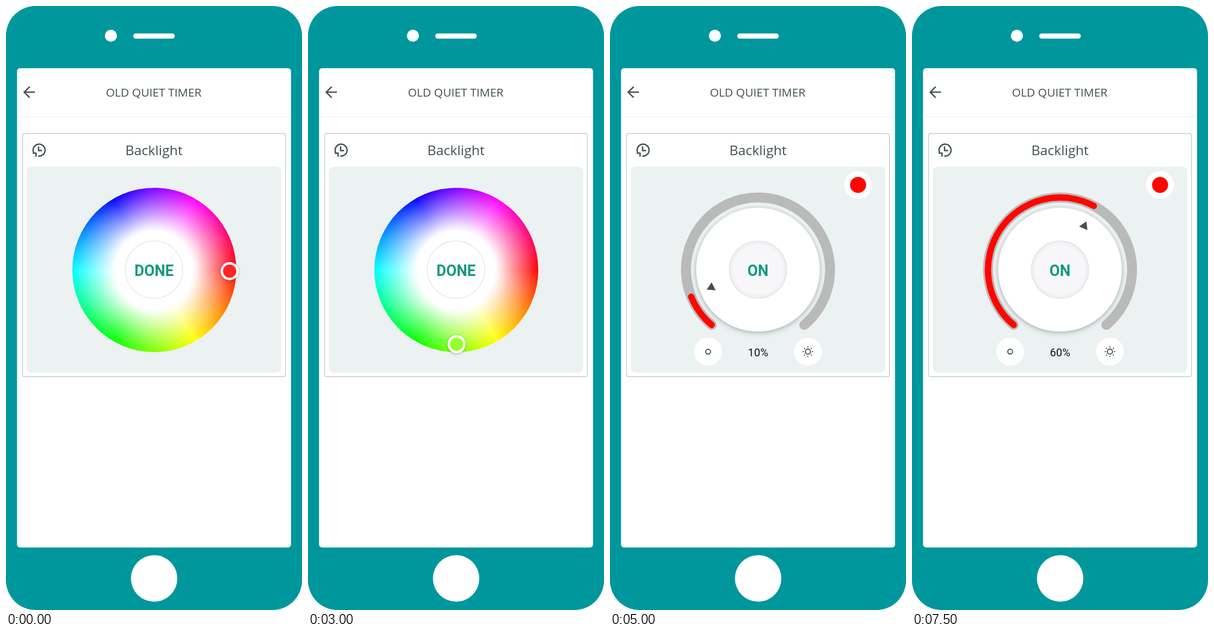
These frames come from a looping animation (491x1000 px, 8000 ms). An HTML page:

```html
<!DOCTYPE html>
<html lang="en">
<head>
<meta charset="utf-8">
<title>Backlight control</title>
<style>
  html, body { margin: 0; width: 100%; height: 100%; overflow: hidden; background: #fff; }
  svg { display: block; width: 100%; height: 100%; }
  text { text-anchor: middle; }
  .label { font-family: "Open Sans", "Noto Sans", sans-serif; fill: #434f54; }
  .button { font: 700 25px Roboto, sans-serif; fill: #15997f; }
  .value { font: 400 18.2px Roboto, sans-serif; fill: #111; }
  .icon { fill: none; stroke: #434f54; stroke-width: 2.3; }
  .small { fill: none; stroke: #2b3336; stroke-width: 1.5; }
  .wheel {
    width: 272px; height: 272px; border-radius: 50%;
    background:
      radial-gradient(circle 136px, #fff 64px, rgba(255,255,255,.92) 71px,
        rgba(255,255,255,.5) 100px, rgba(255,255,255,.16) 125px, rgba(255,255,255,.02) 136px),
      conic-gradient(from 90deg, #f00, #ff0, #0f0, #0ff, #00f, #f0f, #f00);
  }
  #marker { filter: drop-shadow(0 1px 2px rgba(0,0,0,.28)); }
  .knob { filter: drop-shadow(0 3px 4px rgba(60,75,75,.28)); }
</style>
</head>
<body>
<svg viewBox="0 0 491 1000">
  <defs>
    <radialGradient id="dish">
      <stop offset=".86" stop-color="#f7f7f9"/>
      <stop offset="1" stop-color="#ececef"/>
    </radialGradient>
  </defs>

  <!-- phone -->
  <rect width="491" height="1000" rx="49" fill="#00979c"/>
  <g fill="#fff">
    <circle cx="174" cy="49.3" r="10"/>
    <rect x="211" y="45.5" width="69" height="8.5" rx="4.2"/>
    <circle cx="245.7" cy="947.7" r="38.5"/>
    <rect x="18.3" y="103" width="454.5" height="793.5" rx="5"/>
  </g>

  <!-- header and card -->
  <path d="M18.3 183.5H472.8" stroke="#eeF0f0"/>
  <path class="icon" d="M48 142.7H30.5M39.3 133.6L30.2 142.7L39.3 151.8"/>
  <text class="label" x="245" y="150" font-size="19">OLD QUIET TIMER</text>
  <rect x="27.5" y="211.2" width="436" height="402.5" rx="3" fill="#fff" stroke="#c3c9cb" stroke-width="1.2"/>
  <g class="icon" stroke-width="2">
    <path d="M53.5 248.4A9.9 9.9 0 1 0 46.8 244.3M44.3 243.6H49.8V249.6M54 232.5V239.3H60"/>
  </g>
  <text class="label" x="245.5" y="247.4" font-size="22.5">Backlight</text>
  <rect x="34.5" y="266" width="422" height="341" rx="8" fill="#ecf1f1"/>

  <g id="picker">
    <foreignObject x="109.5" y="300.5" width="272" height="272"><div class="wheel"></div></foreignObject>
    <circle cx="245.5" cy="436.5" r="47.6" fill="#fff" stroke="#e2e4e4" stroke-width="1.2"/>
    <text class="button" x="245.5" y="446.5">DONE</text>
    <g id="marker">
      <circle id="tint" r="12"/>
      <circle r="13" fill="none" stroke="#fff" stroke-width="4"/>
    </g>
  </g>

  <g id="dimmer">
    <circle cx="411.5" cy="296.2" r="23.2" fill="#fff"/>
    <circle cx="411.5" cy="296.2" r="13.3" fill="#ff0500"/>
    <g fill="none" stroke-linecap="round">
      <path id="track" stroke="#bababa" stroke-width="16.5"/>
      <path id="level" stroke="#ff0500" stroke-width="10.5"/>
    </g>
    <circle cx="245.5" cy="436.5" r="106" fill="#e4e9e9"/>
    <circle class="knob" cx="245.5" cy="436.5" r="102.5" fill="#fff"/>
    <path id="pointer" d="M170.5 384.5H185L177.8 397.5Z" fill="#434f54"/>
    <circle cx="245.5" cy="436.5" r="47.5" fill="url(#dish)" stroke="#e0e2e3" stroke-width="1.2"/>
    <text class="button" x="245.5" y="446.5">ON</text>
    <circle id="less" cx="162.8" cy="572.3" r="23.2" fill="#fff"/>
    <circle class="small" cx="162.8" cy="572.3" r="4"/>
    <circle cx="328.3" cy="572.3" r="23.2" fill="#fff"/>
    <circle class="small" cx="328.3" cy="572.3" r="4.3"/>
    <path id="rays" class="small"/>
    <text id="value" class="value" x="245.7" y="579.5"></text>
  </g>
</svg>
<script>
  const LOOP = 8000, STEP = 500;
  const CENTER = { x: 245.5, y: 436.5 };
  const START = 130, SWEEP = 280, RADIUS = 119.5;
  const stops = [
    [371, 439], [344.5, 346], [247, 319], [181.5, 339],
    [110.5, 432.5], [162, 540], [246.5, 560], [330, 534], [371, 439]
  ];
  const $ = id => document.getElementById(id);

  function polar(degrees, radius, { x, y } = CENTER) {
    const a = degrees * Math.PI / 180;
    return `${x + radius * Math.cos(a)} ${y + radius * Math.sin(a)}`;
  }

  function arc(percent) {
    const sweep = SWEEP * percent / 100;
    return `M${polar(START, RADIUS)}A${RADIUS} ${RADIUS} 0 ${+(sweep > 180)} 1 ${polar(START + sweep, RADIUS)}`;
  }

  function wheelColor(x, y) {
    const dx = x - CENTER.x, dy = y - CENTER.y;
    const hue = (Math.atan2(dy, dx) * 180 / Math.PI + 360) % 360;
    const saturation = Math.min(0.88, (Math.hypot(dx, dy) - 64) / 72);
    return `hsl(${hue < 5 ? 0 : hue} 100% ${100 - 50 * saturation}%)`.replace(/^hsl\((\d[\d.]*) 100% (.*)%\)$/,
      "hsl($1, 100%, $2%)");
  }

  function showPicker([x, y]) {
    $("marker").setAttribute("transform", `translate(${x} ${y})`);
    $("tint").setAttribute("fill", wheelColor(x, y));
  }

  function showDimmer(percent) {
    $("level").setAttribute("d", percent ? arc(percent) : "");
    $("pointer").setAttribute("transform",
      `rotate(${(percent - 30) * SWEEP / 100} ${CENTER.x} ${CENTER.y})`);
    $("less").style.display = percent ? "" : "none";
    $("value").textContent = percent + "%";
  }

  function draw() {
    const step = Math.floor(performance.now() % LOOP / STEP);
    const picking = step < stops.length;
    $("picker").style.display = picking ? "" : "none";
    $("dimmer").style.display = picking ? "none" : "";
    if (picking) showPicker(stops[step]);
    else showDimmer((step - stops.length) * 10);
    requestAnimationFrame(draw);
  }

  const sun = { x: 328.3, y: 572.3 };
  $("track").setAttribute("d", arc(100));
  $("rays").setAttribute("d", Array.from({ length: 8 }, (_, i) =>
    `M${polar(i * 45, 6.9, sun)}L${polar(i * 45, 8.8, sun)}`).join(""));
  draw();
</script>
</body>
</html>
```
